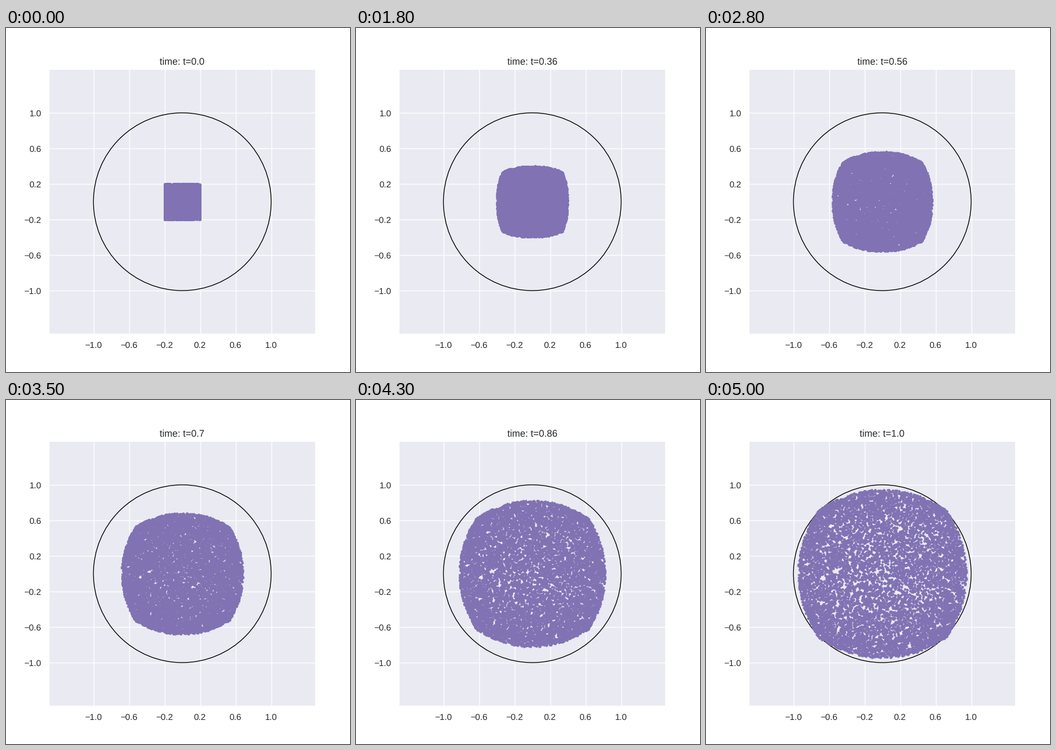
Write a matplotlib script that moves like this. It is 600 px wide and 600 px high and loops after 5.1 s.

```python
import numpy as np
import matplotlib.pyplot as plt
from matplotlib.animation import FuncAnimation

FRAMES = 51
STEP = 0.02
COUNT = 10000
HALF = 0.2  # half side of the starting square
INK = "#262626"

plt.rcParams.update({
    "font.family": "Liberation Sans",
    "text.color": INK,
    "text.hinting": "none",
    "axes.unicode_minus": True,
})

rng = np.random.default_rng(4)
u, v = rng.uniform(-1, 1, (2, COUNT))
depth = np.maximum(abs(u), abs(v))


def positions(t):
    """Outward flow that rounds the square as it expands."""
    push = 0.855 * (1 + 0.6 * np.exp(-t / 0.16))
    reach = np.sqrt(HALF**2 + push * t**2)
    bend = 0.265 * t**2 / (t**2 + 0.09)  # how far the corners lag
    power = 2 + 2 * np.exp(-t / 0.3)
    size = reach * (1 + 0.06 * t * (1 - depth**2))
    x = size * u * (1 - bend * abs(v)**power)
    y = size * v * (1 - bend * abs(u)**power)
    return x, y


fig = plt.figure(figsize=(6, 6), dpi=100, facecolor="white")
ax = fig.add_axes([0.125, 0.11, 0.775, 0.77], facecolor="#EAEAF2")
ax.set_xlim(-1.5, 1.5)
y_max = 1.5 * 0.77 / 0.775
ax.set_ylim(-y_max, y_max)

ticks = [-1.0, -0.6, -0.2, 0.2, 0.6, 1.0]
ax.set_xticks(ticks)
ax.set_yticks(ticks)
ax.tick_params(length=6, pad=3.5, labelsize=11, labelcolor=INK,
               bottom=False, left=False)
ax.set_axisbelow(True)
ax.grid(color="white", linewidth=1)
for spine in ax.spines.values():
    spine.set(color="white", linewidth=1.25)

ax.add_patch(plt.Circle((0, 0), 1, fill=False, color="black", linewidth=1))
dots, = ax.plot([], [], "o", color="#8172B3", markersize=3.3,
                markeredgewidth=0)
title = ax.set_title("", fontsize=12, pad=6)


def draw(i):
    t = round(i * STEP, 2)
    dots.set_data(*positions(t))
    title.set_text(f"time: t={t}")
    return dots, title


anim = FuncAnimation(fig, draw, frames=FRAMES, interval=100,
                     repeat=True, repeat_delay=0)
plt.show()
```
